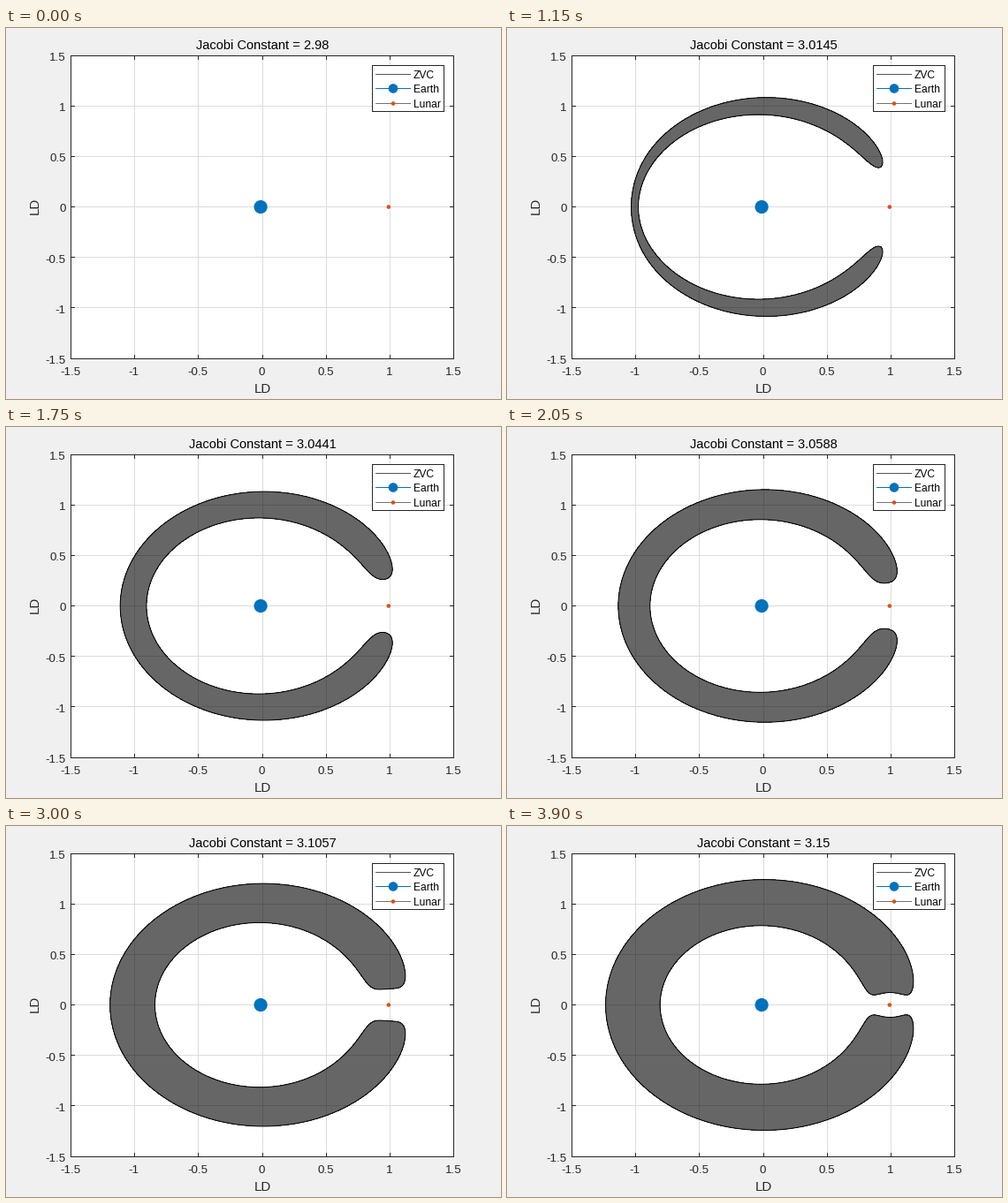
A matplotlib script that plays this animation: 560 by 420 pixels, repeating every 3950 ms.

```python
import numpy as np
import matplotlib.pyplot as plt
from matplotlib.animation import FuncAnimation
from matplotlib.patches import Circle, Rectangle

W, H, DPI = 560, 420, 100
PX = 72 / DPI  # points per pixel
MU = 0.01215
STEP_MS, HOLD, STEPS = 50, 10, 70
INK, BLUE, ORANGE = "#262626", "#0072bd", "#d95319"
GRID = "#dcdcdc"

plt.rcParams["font.family"] = "Liberation Sans"
fig = plt.figure(figsize=(W / DPI, H / DPI), dpi=DPI, facecolor="#f0f0f0")
ax = fig.add_axes([0, 0, 1, 1])
ax.set_xlim(0, W)
ax.set_ylim(H, 0)
ax.axis("off")


def sx(x):
    return 289.85 + 144.53 * x


def sy(y):
    return 202.55 - 114.15 * y


def pixel(v):
    return int(np.floor(v + 0.25))


def box(x0, y0, x1, y1, color=INK, z=5):
    """Fill whole pixels from (x0, y0) to (x1, y1), both included."""
    ax.add_patch(Rectangle((x0, y0), x1 - x0 + 1, y1 - y0 + 1, fc=color,
                           ec="none", lw=0, snap=False, zorder=z))


def frame(x0, y0, x1, y1, z):
    box(x0, y0, x1, y1, INK, z)
    box(x0 + 1, y0 + 1, x1 - 1, y1 - 1, "white", z + 0.1)


def dot(x, y, r, color, z=6):
    ax.add_patch(Circle((x, y), r, fc=color, ec="none", lw=0, snap=False,
                        zorder=z))


def label(x, y, s, size, ha="center", color=INK, **kw):
    return ax.text(x, y, s, fontsize=size * PX, ha=ha, va="baseline",
                   color=color, zorder=9, **kw)


# Axes box, grid, ticks
left, right = pixel(sx(-1.5)), pixel(sx(1.5))
top, bottom = pixel(sy(1.5)), pixel(sy(-1.5))
frame(left, top, right, bottom, 0)
for v in np.arange(-1.5, 1.6, 0.5):
    x, y = pixel(sx(v)), pixel(sy(v))
    if abs(v) < 1.5:
        box(x, top + 1, x, bottom - 1, GRID, 0.3)
        box(left + 1, y, right - 1, y, GRID, 0.3)
        box(x, top, x, top + 4)
        box(x, bottom - 4, x, bottom)
        box(left, y, left + 4, y)
        box(right - 4, y, right, y)
    label(sx(v) - 0.5, 393, f"{v:g}", 13.33)
    label(67.7, np.ceil(sy(v) + 5.42), f"{v:g}", 13.33, ha="right")

label(290.4, 413, "LD", 15)
label(37, 201, "LD", 15, rotation=90, rotation_mode="anchor")
title = label(290.2, 24, "", 14.67, color="black")

dot(sx(-MU), sy(0), 7.6, BLUE)
dot(sx(1 - MU) + 0.2, sy(0), 2.3, ORANGE)

# Legend
frame(414, 42, 495, 94, 7)
entries = [("ZVC", 52, "#555555", 0, None),
           ("Earth", 68, BLUE, 5.3, BLUE),
           ("Lunar", 85, "#77706e", 2.3, ORANGE)]
for name, y, color, r, fill in entries:
    box(418, y, 457, y, color, 8)
    if r:
        dot(438, y + 0.5, r, fill, 8.5)
    label(460.7, y + 5, name, 12, ha="left", color="black")

# Twice the effective potential of the rotating frame
axis = np.linspace(-1.35, 1.35, 271)
gx, gy = np.meshgrid(axis, axis)
r1 = np.maximum(np.hypot(gx + MU, gy), 0.02)
r2 = np.maximum(np.hypot(gx - 1 + MU, gy), 0.002)
potential = gx**2 + gy**2 + 2 * (1 - MU) / r1 + 2 * MU / r2
px, py = sx(gx), sy(gy)
constants = np.linspace(2.98, 3.15, STEPS)
shown = []


def update(i):
    while shown:
        shown.pop().remove()
    c = constants[max(0, i - HOLD + 1)]
    title.set_text(f"Jacobi Constant = {c:.5g}")
    if c > potential.min():
        shown.append(ax.contourf(px, py, potential, [0, c], colors="black",
                                 alpha=0.6, zorder=2))
        shown.append(ax.contour(px, py, potential, [c], colors="black",
                                linewidths=PX, zorder=3))
    return [title, *shown]


anim = FuncAnimation(fig, update, frames=HOLD + STEPS - 1, interval=STEP_MS,
                     repeat=True, repeat_delay=0, init_func=lambda: [title])
plt.show()
```
